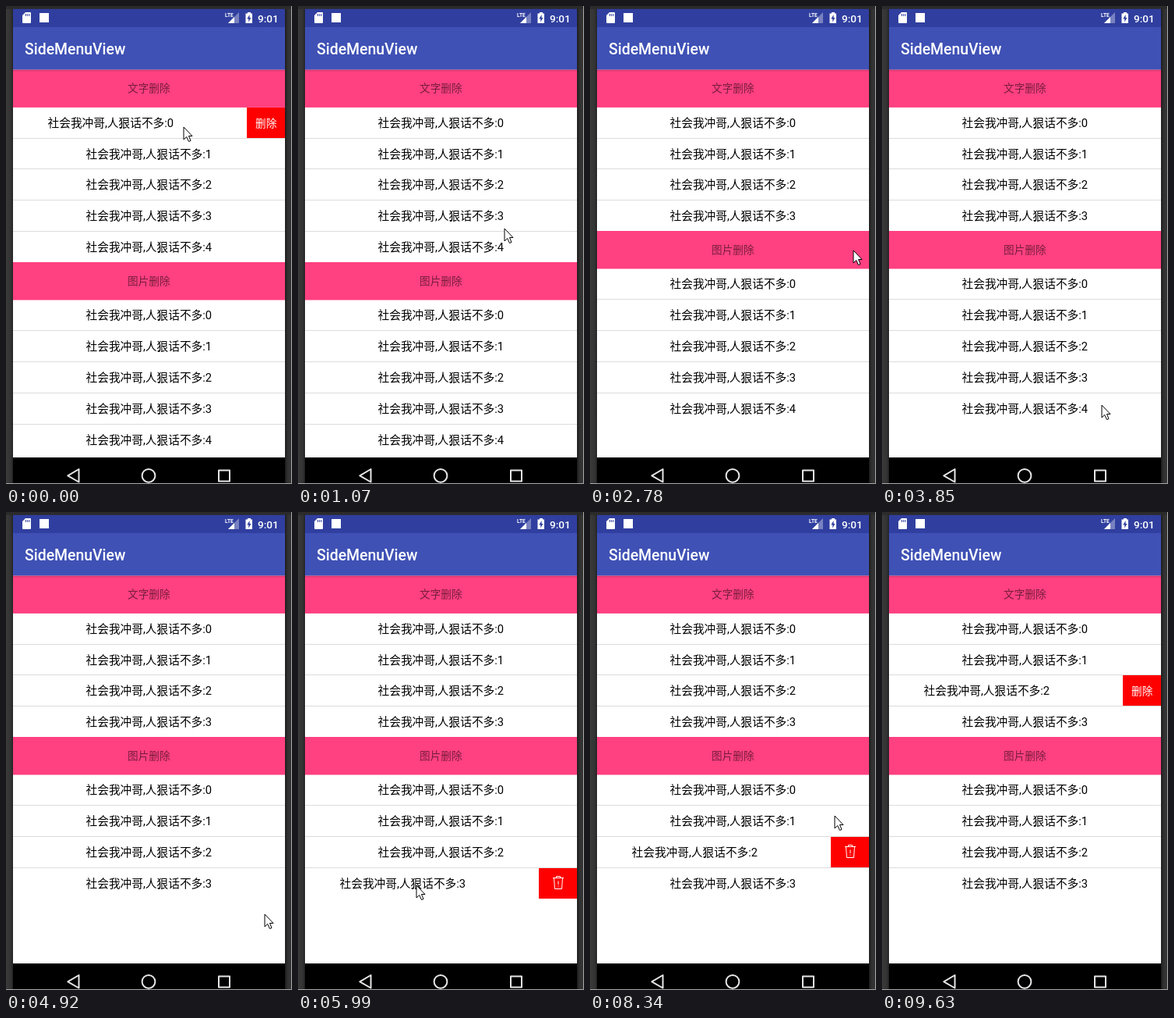
An HTML page that plays this animation: 367x612 px, repeating every 9.84 s.

```html
<!DOCTYPE html>
<html lang="zh-CN">
<head>
<meta charset="utf-8">
<title>SideMenuView</title>
<style>
  html, body { margin: 0; width: 100%; height: 100%; overflow: hidden; background: #fff; }
  svg { display: block; width: 367px; height: 612px; }
  text { font-family: Roboto, "Noto Sans CJK SC", "Noto Sans SC", "Noto Sans CJK", sans-serif; }
  .item { font-size: 14.7px; text-anchor: middle; }
  .head { font-size: 13.6px; fill-opacity: .54; text-anchor: middle; }
  .del { font-size: 13.6px; fill: #fff; text-anchor: middle; }
  .title { font-size: 19.4px; font-weight: 500; fill: #fff; }
  .clock { font-size: 13.6px; font-weight: 500; fill: #fff; }
  .lte { font-size: 6.6px; font-weight: 700; fill: #fff; }
  .nav { fill: none; stroke: #e6e6e6; stroke-width: 2; stroke-linejoin: round; }
  .bin { fill: none; stroke: #fff; stroke-width: 1; }
</style>
</head>
<body>
<svg viewBox="0 0 367 612">
  <defs>
    <linearGradient id="left">
      <stop offset="0" stop-color="#3a3a3a"/>
      <stop offset=".7" stop-color="#333"/>
      <stop offset="1" stop-color="#222"/>
    </linearGradient>
    <linearGradient id="right">
      <stop offset="0" stop-color="#1c1c1c"/>
      <stop offset=".35" stop-color="#303030"/>
      <stop offset="1" stop-color="#383838"/>
    </linearGradient>
    <linearGradient id="shade" x2="0" y2="1">
      <stop offset="0" stop-opacity=".2"/>
      <stop offset="1" stop-opacity="0"/>
    </linearGradient>
  </defs>

  <rect width="367" height="612" fill="#fff"/>
  <g id="texts"></g>
  <g id="icons"></g>

  <!-- app bar and status bar -->
  <rect x="9" y="81.4" width="349" height="3" fill="url(#shade)"/>
  <rect x="9" y="27" width="349" height="54.4" fill="#3f51b5"/>
  <text class="title" x="24" y="62">SideMenuView</text>
  <rect x="9" y="3" width="349" height="24" fill="#303f9f"/>
  <path d="M25 8H31Q32 8 32 9V21Q32 22 31 22H22Q21 22 21 21V12Z" fill="#fff"/>
  <path d="M25.500 10V13M27.700 10V13M29.900 10V13" stroke="#303f9f"/>
  <rect x="43" y="9" width="12" height="12" fill="#fff"/>
  <path d="M299 8V22H285Z" fill="#fff" fill-opacity=".35"/>
  <path d="M293 14V22H285Z" fill="#fff"/>
  <text class="lte" x="281" y="14">LTE</text>
  <path d="M310 8H314V9.500H316V22H307.500V9.500H310Z" fill="#fff"/>
  <path d="M312.600 11L309.300 16.500H311.300V20.500L314.500 15H312.600Z" fill="#303f9f"/>
  <text class="clock" x="323" y="20.500">9:01</text>

  <!-- navigation bar and bezel -->
  <rect x="9" y="578" width="349" height="34" fill="#000"/>
  <path class="nav" d="M93.500 593V609.500L79.300 601.300Z"/>
  <circle class="nav" cx="183" cy="601.300" r="8.400"/>
  <rect class="nav" x="273" y="594.500" width="14" height="14"/>
  <rect width="9" height="612" fill="url(#left)"/>
  <rect x="358" width="9" height="612" fill="url(#right)"/>
  <rect width="367" height="3.800" fill="#2b2b2b"/>
  <path d="M366.500 0V611.500H0" fill="none" stroke="#aaa"/>

  <path id="cursor" d="M.5 .5V16.500L4.200 13L7 19L9.500 18L7 12H11.500Z" fill="#fff" stroke="#000" stroke-linejoin="round"/>
</svg>

<script>
const LOOP = 9840, STEPS = 46, OPEN = 49, PITCH = 39.8, SNAP = 1.6;
const $ = id => document.getElementById(id);

const swipes = [
  { row: "texts0", open: -SNAP, close: 1 },
  { row: "texts4", open: 7 },
  { row: "icons4", open: 18 },
  { row: "icons3", open: 27, close: 33 },
  { row: "icons2", open: 33, close: 40 },
  { row: "texts2", open: 42 }
];
const removed = { texts: 13, icons: 23 };

// where the pointer turns: [step, x, y]
const turns = [
  [0, 228, 155], [5, 265, 285], [8, 197, 305], [11, 338, 313], [13, 338, 313],
  [18, 282, 511], [20, 202, 515], [23, 332, 515], [28, 152, 478], [32, 212, 432],
  [35, 158, 434], [39, 314, 389], [43, 200, 228], [45, 285, 514]
];

const clamp = p => Math.min(1, Math.max(0, p));
const snap = p => 1 - (1 - clamp(p)) ** 5;
const smooth = p => p * p * (3 - 2 * p);

function slideX(step, { open, close = Infinity }) {
  return Math.round(OPEN * (snap((step - open) / SNAP) - snap((step - close) / SNAP)));
}

function pointer(step) {
  const n = Math.max(1, turns.findIndex(t => t[0] >= step));
  const [s0, x0, y0] = turns[n - 1], [s1, x1, y1] = turns[n];
  const p = smooth((step - s0) / (s1 - s0));
  return [Math.round(x0 + (x1 - x0) * p), Math.round(y0 + (y1 - y0) * p)];
}

const bin = `<path class="bin" d="M327 13.500H341M331.500 13.500V11.500H336.500V13.500
  M328.500 13.500L329.500 27.500H338.500L339.500 13.500M334 17.500V22M334 23.500V24.500"/>`;
const word = `<text class="del" x="333.700" y="25.500">删除</text>`;

function buildList(id, title, top, label) {
  const headH = 48.5;
  let rows = "";
  for (let i = 0; i < 5; i++) {
    const y = Math.round(top + headH - 1.1 + PITCH * i);
    const line = i ? `<rect x="9" width="349" height="1" fill="#dcdcdc"/>` : "";
    rows += `<g id="${id}${i}" transform="translate(0 ${y})">${line}<g class="slide">
      <text class="item" x="183.300" y="25.600">社会我冲哥,人狠话不多:${i}</text>
      <g transform="translate(${OPEN} 0)"><rect x="309" y="1" width="49" height="39" fill="#f00"/>${label}</g>
    </g></g>`;
  }
  $(id).innerHTML = rows + `<rect x="9" y="${top}" width="349" height="${headH}" fill="#ff4081"/>
    <text class="head" x="183.300" y="${Math.round(top + 29)}">${title}</text>`;
}
buildList("texts", "文字删除", 81.4, word);
buildList("icons", "图片删除", 328, bin);

function draw(now) {
  const step = Math.floor(((now + 4) % LOOP) * STEPS / LOOP);
  for (const s of swipes) {
    $(s.row).querySelector(".slide").setAttribute("transform", `translate(${-slideX(step, s)} 0)`);
  }
  for (const id in removed) {
    $(id + 4).style.display = step >= removed[id] ? "none" : "";
  }
  $("icons").setAttribute("transform", `translate(0 ${step >= removed.texts ? -40 : 0})`);
  const [x, y] = pointer(step);
  $("cursor").setAttribute("transform", `translate(${x - .5} ${y - .5})`);
  $("cursor").style.display = step === STEPS - 1 ? "none" : "";
}

const start = performance.now();
function tick() {
  draw(performance.now() - start);
  requestAnimationFrame(tick);
}
tick();
</script>
</body>
</html>
```
